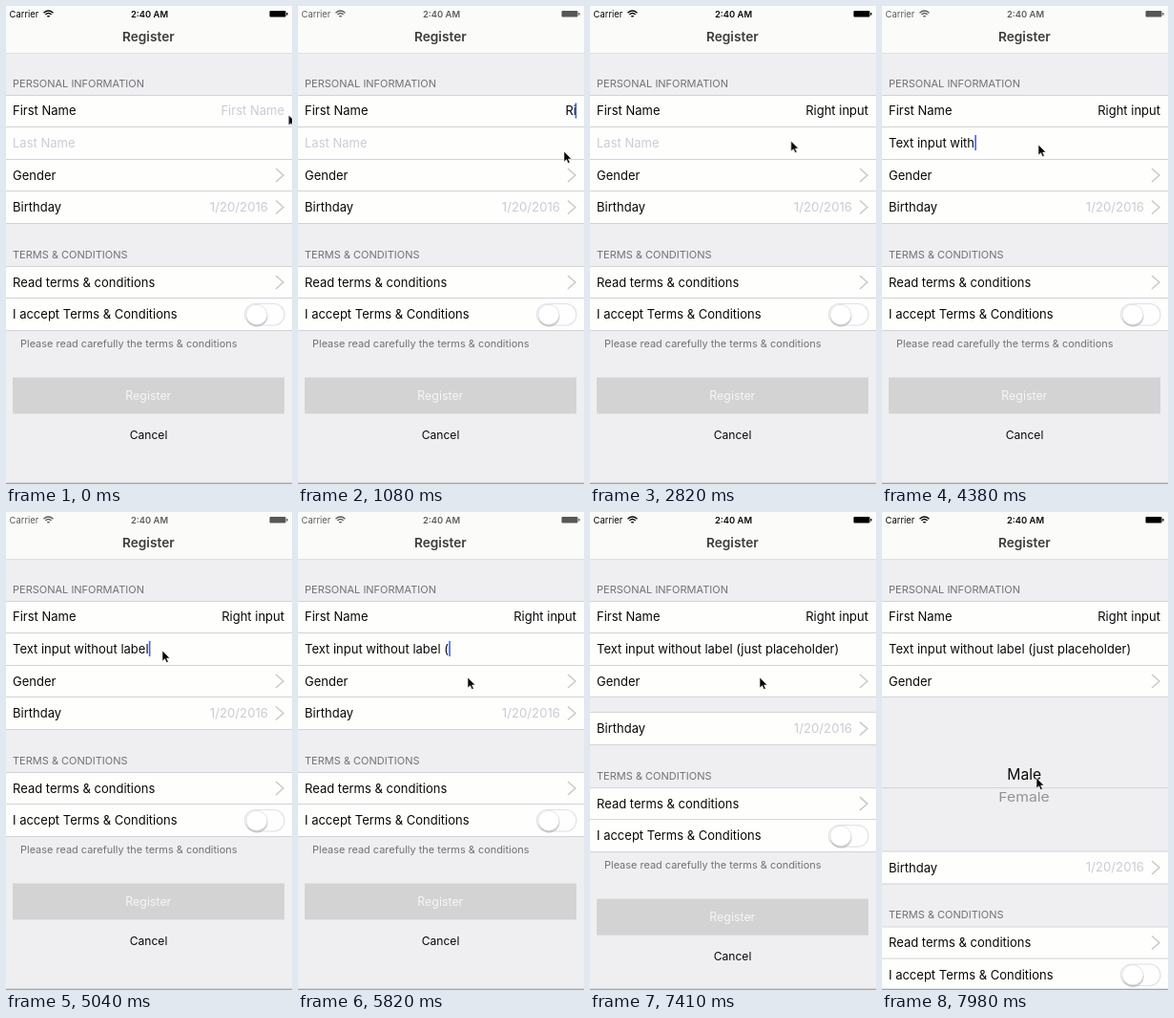
Animation of 300 by 500 pixels, one loop 8000 ms. Source, as an HTML page:

```html
<!DOCTYPE html>
<html lang="en">
<head>
<meta charset="utf-8">
<title>Register form</title>
<style>
  html, body { margin: 0; width: 100%; height: 100%; overflow: hidden; background: #efeff2; }
  svg { display: block; width: 300px; height: 500px; }
  text { font: 13px Inter, "Open Sans", sans-serif; fill: #080808; white-space: pre; }
  .end { text-anchor: end; }
  .mid { text-anchor: middle; }
  .head { font-size: 11px; fill: #717176; }
  .note { font-size: 10.95px; fill: #717176; }
  .status { font-size: 9.4px; }
  .strong { font-weight: 600; }
  .hint { fill: #cbcbd5; }
  .wheel { font-size: 15.7px; }
  .page { fill: #efeff2; }
  .cell { fill: #fefefd; }
  .rule { stroke: #d2d2d8; stroke-width: 1; }
  .chevron { fill: none; stroke: #c7c7cd; stroke-width: 1.4; }
  .caret { fill: #4463e4; }

  #lower, #picker, #pointer { animation: 8s linear infinite; }
  #lower { animation-name: open; }
  #picker { animation-name: reveal; }
  #pointer { animation-name: travel; }

  @keyframes open {
    0%, 91.8% { transform: translateY(0); animation-timing-function: ease-in-out; }
    95.6%, 100% { transform: translateY(161.5px); }
  }
  @keyframes reveal {
    0%, 91.8% { opacity: 0; }
    95.6%, 100% { opacity: 1; }
  }
  @keyframes travel {
    0% { transform: translate(296.5px, 114px); animation-timing-function: ease-out; }
    4.5%, 8.5% { transform: translate(277px, 113px); animation-timing-function: ease-in-out; }
    13%, 31.2% { transform: translate(279px, 152px); animation-timing-function: ease-in; }
    35.25% { transform: translate(211px, 141px); animation-timing-function: ease-out; }
    39.2%, 65% { transform: translate(164px, 145px); animation-timing-function: ease-in-out; }
    71.5%, 94.5% { transform: translate(178px, 173px); animation-timing-function: ease-in-out; }
    99.5%, 100% { transform: translate(162px, 278px); }
  }
</style>
</head>
<body>
<svg viewBox="0 0 300 500">
  <defs>
    <path id="chevron" class="chevron" d="M283 -7 L291 0 L283 7"/>
  </defs>

  <rect class="page" width="300" height="500"/>
  <rect fill="#fbfbfa" width="300" height="49"/>
  <path class="rule" d="M0 49.5H300" opacity=".5"/>

  <g id="status">
    <text class="status" x="3.6" y="11.7">Carrier</text>
    <g fill="none" stroke="#080808" stroke-width="1.4">
      <path d="M39.5 7.2Q44.5 2.8 49.5 7.2M41.4 9Q44.5 6.2 47.6 9"/>
      <path d="M43.2 10.7H45.8"/>
    </g>
    <text class="status strong mid" x="150.5" y="11.5">2:40 AM</text>
    <rect x="276.5" y="5" width="17" height="6.5" rx="1"/>
    <rect x="294.2" y="7" width="1.3" height="2.6"/>
  </g>
  <text class="strong mid" x="149.3" y="36.8" style="font-size:13.7px;fill:#3c3c3c">Register</text>

  <text class="head" x="7" y="84.8">PERSONAL INFORMATION</text>
  <rect class="cell" y="93" width="300" height="101"/>
  <path class="rule" d="M0 93.5H300M0 126.5H300M0 160.5H300"/>
  <text x="7" y="114.3">First Name</text>
  <text id="first" class="end" x="292" y="114"></text>
  <rect id="firstCaret" class="caret" x="290.7" y="101.5" width="1.6" height="16"/>
  <text id="last" x="7" y="147.6"></text>
  <rect id="lastCaret" class="caret" y="135" width="1.6" height="16"/>
  <text x="7" y="181.6">Gender</text>
  <use href="#chevron" y="177"/>

  <g id="picker">
    <text class="wheel mid" x="149.2" y="280">Male</text>
    <path class="rule" d="M0 288.5H300"/>
    <text class="wheel mid" transform="translate(149 303) scale(1 .85)" opacity=".4">Female</text>
  </g>

  <g id="lower">
    <rect class="page" y="194" width="300" height="310"/>
    <rect class="cell" y="193.5" width="300" height="33.5"/>
    <path class="rule" d="M0 193.5H300M0 227.5H300"/>
    <text x="7" y="215">Birthday</text>
    <text class="end hint" x="275" y="214.8" style="font-size:13.2px">1/20/2016</text>
    <use href="#chevron" y="210.5"/>

    <text class="head" x="7" y="263.8">TERMS &amp; CONDITIONS</text>
    <rect class="cell" y="272" width="300" height="67"/>
    <path class="rule" d="M0 272.5H300M0 305.5H300M0 339.5H300"/>
    <text x="7" y="293.5">Read terms &amp; conditions</text>
    <use href="#chevron" y="289"/>
    <text x="7" y="327">I accept Terms &amp; Conditions</text>
    <rect x="250.5" y="311.5" width="41.5" height="22.5" rx="11.2" fill="#fefefe" stroke="#e2e2e8" stroke-width="1.2"/>
    <ellipse cx="263.3" cy="324.8" rx="11.2" ry="10.6" fill="#aaa" opacity=".6"/>
    <ellipse cx="263" cy="322.8" rx="11" ry="10.5" fill="#fff" stroke="#d8d8d8" stroke-width=".7"/>
    <text class="note" x="15" y="356.5">Please read carefully the terms &amp; conditions</text>

    <rect x="7" y="388.5" width="285" height="38" fill="#d3d3d4"/>
    <text class="mid" x="149.3" y="412.3" style="font-size:12.4px;fill:#f6f6f4">Register</text>
    <text class="mid" x="149.5" y="453.3" style="font-size:12.1px">Cancel</text>
  </g>
  <path class="rule" d="M0 193.5H300"/>

  <rect y="498.7" width="300" height="1.3" fill="#a4a4a4"/>

  <g id="pointer">
    <path d="M0 0V11L2.6 8.7L4.4 12.6L6.3 11.8L4.6 8H8Z" fill="#080808" stroke="#fff" stroke-width=".6"/>
  </g>
</svg>
<script>
  const LOOP = 8000;
  const $ = id => document.getElementById(id);

  // Each key pairs a time in ms with the number of characters typed by then.
  const fields = [
    { id: "first", full: "Right input", hint: "First Name", focus: [560, 3240],
      keys: [[850, 0], [1830, 9.3], [2060, 11]] },
    { id: "last", full: "Text input without label (just placeholder)", hint: "Last Name", focus: [3270, 7280],
      keys: [[3550, 0], [4380, 15.4], [4900, 24], [5600, 25], [5800, 26.1], [6570, 42.3], [6660, 43]] }
  ];

  function typedAt(keys, t) {
    if (t <= keys[0][0]) return 0;
    for (let i = 1; i < keys.length; i++) {
      const [t0, n0] = keys[i - 1], [t1, n1] = keys[i];
      if (t < t1) return Math.floor(n0 + (n1 - n0) * (t - t0) / (t1 - t0));
    }
    return keys[keys.length - 1][1];
  }

  // Solid, fade out, hidden, fade in, once a second.
  function blink(ms) {
    const phase = ms % 1000;
    return Math.max(0, Math.min(1, Math.abs(phase - 725) / 125 - 1));
  }

  function drawField({ id, full, hint, focus, keys }, t) {
    const count = typedAt(keys, t);
    const begin = keys[0][0], finish = keys[keys.length - 1][0];
    const typing = t >= begin && t < finish;
    const text = $(id), caret = $(id + "Caret");

    const content = count ? full.slice(0, count) : hint;
    if (text.textContent !== content) text.textContent = content;
    text.classList.toggle("hint", !count);

    const focused = t >= focus[0] && t < focus[1];
    const idle = t - (t < begin ? focus[0] : finish);
    caret.style.opacity = !focused ? 0 : typing ? 1 : blink(idle);
    if (id === "last") caret.setAttribute("x", 7.3 + (count ? text.getComputedTextLength() : 0));
    return typing;
  }

  const start = performance.now();
  function draw() {
    const t = (performance.now() - start) % LOOP;
    const typing = fields.map(field => drawField(field, t)).some(Boolean);
    $("status").style.opacity = typing ? 0.65 : 1;
    requestAnimationFrame(draw);
  }
  draw();
</script>
</body>
</html>
```
